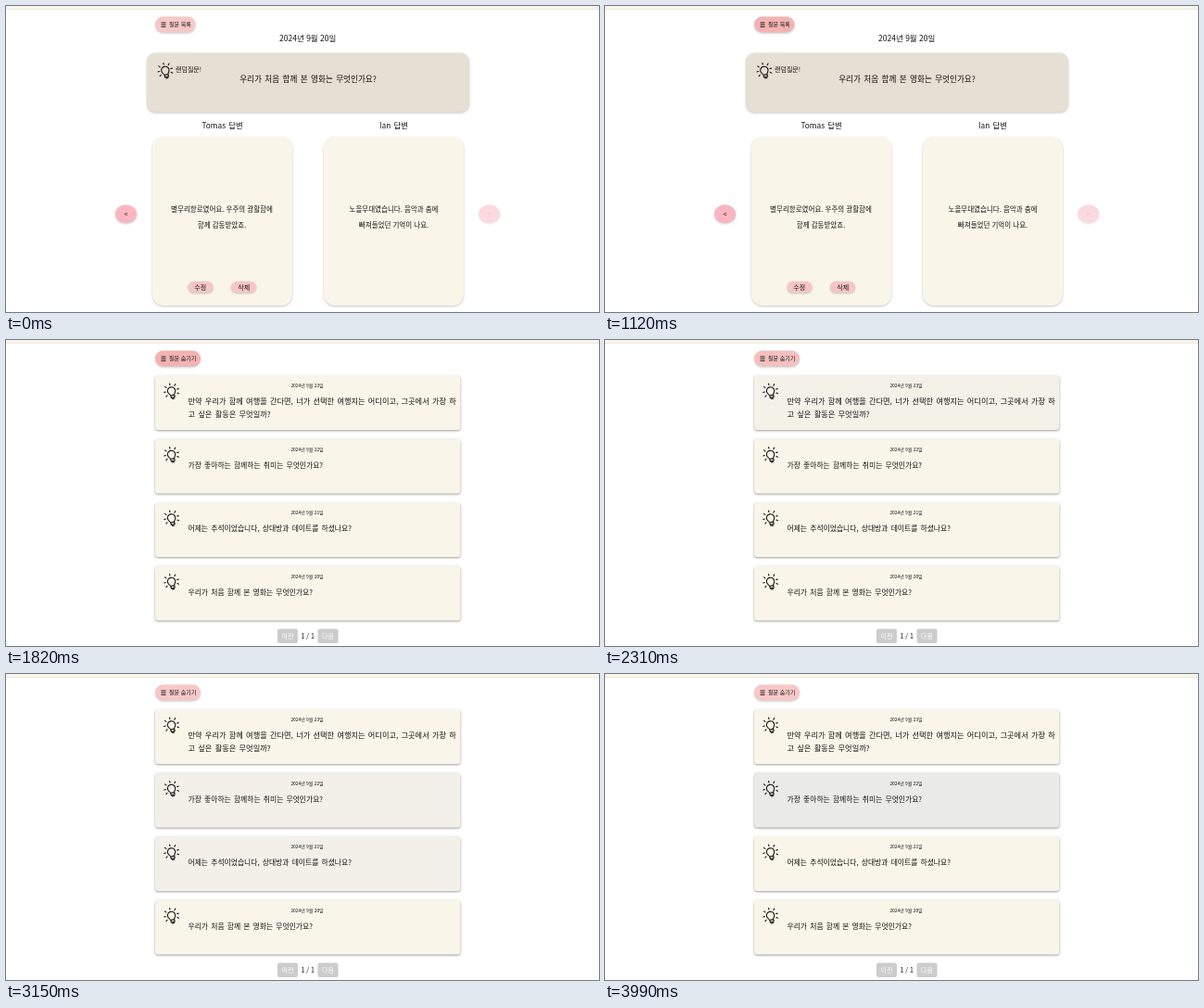
These frames come from a looping animation (640x330 px, 4060 ms). An HTML page:

```html
<!DOCTYPE html>
<html lang="ko">
<head>
<meta charset="utf-8">
<style>
  html, body { margin: 0; width: 100%; height: 100%; overflow: hidden; background: #fff; }
  svg { display: block; }
  text { font-family: "Noto Sans CJK KR", "Noto Sans", sans-serif; font-size: 7px; fill: #111; }
  .mid { text-anchor: middle; }
  .hand { font-weight: 300; word-spacing: 1px; }
  .answer { font-size: 7.5px; word-spacing: 0; }
  .paper { fill: #f9f5e9; }
  .pink { fill: #f7c5c8; }
  .soft { filter: drop-shadow(0 1px 1px rgba(0, 0, 0, .22)); }
  .card { filter: drop-shadow(0 1px 1px rgba(0, 0, 0, .38)); }
  .menu text { font-size: 6px; font-weight: 500; }
</style>
</head>
<body>
<svg width="640" height="330" viewBox="0 0 640 330">
  <defs>
    <g id="bulb" fill="none" stroke="#111" stroke-width="1.1" stroke-linecap="round" stroke-linejoin="round">
      <g transform="rotate(-14)">
        <path d="M-2 4.2C-2 2.8-4.2 2-4.2-.6A4.2 4.2 0 0 1 4.2-.6C4.2 2 2 2.8 2 4.2ZM-2 4.2V6.6H2V4.2M-1 8H1"/>
        <path d="M0-7.2V-8.8M-4.6-5.4-5.8-6.7M4.6-5.4 5.8-6.7M-6.3-1H-8M6.3-1H8M-5.6 3-7 4M5.6 3 7 4"/>
      </g>
    </g>
  </defs>

  <rect class="paper" width="640" height="3"/>
  <rect y="3" width="640" height="1" fill="#eeeae2"/>

  <g class="menu">
    <rect id="button" class="soft" x="161" y="11.5" height="17" rx="8.5"/>
    <path d="M167.5 18H172.5M167.5 20.2H172.5M167.5 22.4H172.5" stroke="#111" stroke-width=".9"/>
    <text id="label" x="176" y="22.3"></text>
  </g>

  <g id="detail">
    <text class="mid" x="325.7" y="38" style="font-size:8.5px">2024년 9월 20일</text>
    <rect class="soft" x="152" y="50.5" width="348" height="64" rx="9" fill="#e6dfd3"/>
    <use href="#bulb" x="172" y="70"/>
    <text class="hand" x="183" y="70.5">랜덤질문!</text>
    <text class="hand mid" x="326" y="82" style="font-size:8.6px">우리가 처음 함께 본 영화는 무엇인가요?</text>

    <text class="hand mid" x="233.5" y="131.7" style="font-size:8.3px">Tomas 답변</text>
    <text class="hand mid" x="418.5" y="131.7" style="font-size:8.3px">Ian 답변</text>
    <rect class="paper soft" x="158" y="141" width="151" height="182" rx="12"/>
    <rect class="paper soft" x="343" y="141" width="151" height="182" rx="12"/>
    <text class="hand answer mid" x="233" y="222">별무리항로였어요. 우주의 광활함에</text>
    <text class="hand answer mid" x="233" y="239">함께 감동받았죠.</text>
    <text class="hand answer mid" x="418.5" y="222">노을무대였습니다. 음악과 춤에</text>
    <text class="hand answer mid" x="418.5" y="239">빠져들었던 기억이 나요.</text>

    <rect class="pink soft" x="196.5" y="297" width="27" height="12" rx="6"/>
    <rect class="pink soft" x="243" y="297" width="27" height="12" rx="6"/>
    <text class="mid" x="209.7" y="305.5" font-weight="500">수정</text>
    <text class="mid" x="256.7" y="305.5" font-weight="500">삭제</text>

    <g id="previous">
      <ellipse class="soft" cx="129.5" cy="224.3" rx="11.5" ry="10" fill="#f9b6c1"/>
      <text class="mid" x="129.5" y="226.8" font-weight="500">&lt;</text>
    </g>
    <g opacity=".5">
      <ellipse class="soft" cx="521.7" cy="224.3" rx="11.5" ry="10" fill="#f9b6c1"/>
      <text class="mid" x="521.7" y="226.8" style="fill:#d98d9c">&gt;</text>
    </g>
  </g>

  <g id="list">
    <g id="cards"></g>
    <rect x="293" y="311.5" width="22" height="15.5" rx="2" fill="#ccc"/>
    <rect x="336.5" y="311.5" width="22" height="15.5" rx="2" fill="#ccc"/>
    <text class="mid" x="304" y="321.8" style="fill:#fff">이전</text>
    <text class="mid" x="325.7" y="321.8">1 / 1</text>
    <text class="mid" x="347.5" y="321.8" style="fill:#fff">다음</text>
  </g>
</svg>

<script>
const LOOP = 4060, STEP = 70, LIST_AT = 1260;
const el = id => document.getElementById(id);

const questions = [
  ["만약 우리가 함께 여행을 간다면, 너가 선택한 여행지는 어디이고, 그곳에서 가장 하", "고 싶은 활동은 무엇일까?"],
  ["가장 좋아하는 함께하는 취미는 무엇인가요?"],
  ["어제는 추석이었습니다, 상대방과 데이트를 하셨나요?"],
  ["우리가 처음 함께 본 영화는 무엇인가요?"]
];

el("cards").innerHTML = questions.map((lines, i) => `
  <g transform="translate(161 ${38 + i * 68.5})">
    <rect class="card" width="329.5" height="59" rx="3.5"/>
    <use href="#bulb" x="17.7" y="17.5"/>
    <text class="hand mid" x="164" y="13" style="font-size:4.9px;word-spacing:0">2024년 9월 ${23 - i}일</text>
    ${lines.map((line, row) => `<text class="hand" x="35.5" y="${31 + row * 14}"
      style="font-size:${lines.length > 1 ? 8.2 : 7.8}px">${line}</text>`).join("")}
  </g>`).join("");
const cards = [...document.querySelectorAll(".card")];

// Hover strength as [time, value] points, joined by straight lines
const buttonHover = [[280, 0], [560, 1], [2100, 1], [2450, 0]];
const cardHover = [
  [[2240, 0], [2450, 1], [2660, 1], [2730, .25], [2870, 0]],
  [[2660, 0], [2730, 1], [3080, 1], [3220, 0], [3850, 0], [3990, 1]],
  [[3080, 0], [3220, 1], [3290, 1], [3430, 0], [3780, 0], [3850, .6], [3920, .4], [3990, 0]],
  [[3290, 0], [3430, 1], [3780, 1], [3920, 0]]
];

function valueAt(points, t) {
  const next = points.findIndex(p => p[0] > t);
  if (next < 0) return points[points.length - 1][1];
  if (next === 0) return points[0][1];
  const [t0, a] = points[next - 1], [t1, b] = points[next];
  return a + (b - a) * (t - t0) / (t1 - t0);
}

const mix = (from, to, k) => `rgb(${from.map((c, i) => Math.round(c + (to[i] - c) * k))})`;

function draw(now) {
  const t = Math.floor(now % LOOP / STEP) * STEP;
  const listed = t >= LIST_AT;
  el("detail").style.display = listed ? "none" : "";
  el("list").style.display = listed ? "" : "none";
  el("label").textContent = listed ? "질문 숨기기" : "질문 목록";
  el("button").setAttribute("width", listed ? 49 : 43.5);
  el("button").style.fill = mix([247, 200, 200], [243, 179, 179], valueAt(buttonHover, t));
  cards.forEach((card, i) => {
    card.style.fill = mix([249, 245, 233], [234, 234, 232], valueAt(cardHover[i], t));
  });
}

const start = performance.now();
function tick() {
  draw(performance.now() - start);
  requestAnimationFrame(tick);
}
tick();
</script>
</body>
</html>
```
